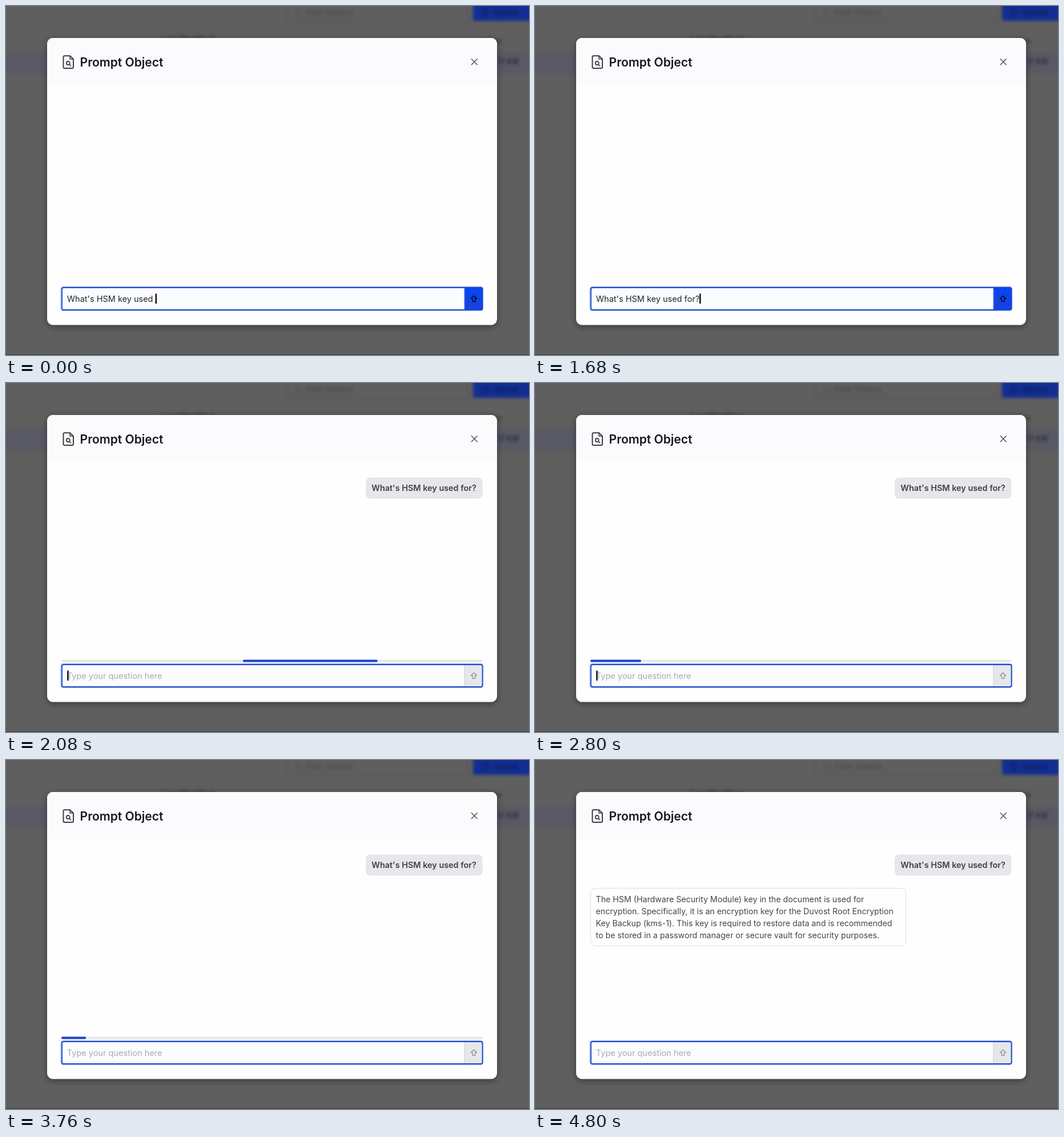
These frames come from a looping animation (916x611 px, 4.88 s). An HTML page with a canvas:

```html
<!DOCTYPE html>
<html lang="en">
<head>
<meta charset="utf-8">
<title>Prompt dialog</title>
<style>
  html, body { margin: 0; width: 100%; height: 100%; overflow: hidden; background: #5f5f5f; }
  canvas { display: block; width: 916px; height: 611px; }
</style>
</head>
<body>
<canvas id="stage" width="916" height="611"></canvas>
<script>
const W = 916, H = 611, LOOP = 4880, TICK = 80;
const SENT = 1760, ANSWERED = 3840;
const QUESTION = "What's HSM key used for?";
const ANSWER = [
  "The HSM (Hardware Security Module) key in the document is used for",
  "encryption. Specifically, it is an encryption key for the Duvost Root Encryption",
  "Key Backup (kms-1). This key is required to restore data and is recommended",
  "to be stored in a password manager or secure vault for security purposes."
];
const BLUE = "#2146cf", GREY = "#e6e7ea";
const TRACK = { x: 97, y: 484.5, w: 738, h: 4 };
const canvas = document.getElementById("stage");
const ctx = canvas.getContext("2d");

const clamp = v => Math.min(1, Math.max(0, v));
const font = (size, weight = 400) => `${weight} ${size}px Inter, "Open Sans", sans-serif`;

function text(str, x, y, size, color, weight, align = "left") {
  ctx.font = font(size, weight);
  ctx.textAlign = align;
  ctx.fillStyle = color;
  ctx.fillText(str, x, y);
}

function box(x, y, w, h, r, fill, stroke, line = 1) {
  ctx.beginPath();
  ctx.roundRect(x, y, w, h, r);
  if (fill) { ctx.fillStyle = fill; ctx.fill(); }
  if (stroke) { ctx.strokeStyle = stroke; ctx.lineWidth = line; ctx.stroke(); }
}

function path(d, color, width) {
  ctx.strokeStyle = color;
  ctx.lineWidth = width;
  ctx.lineCap = ctx.lineJoin = "round";
  ctx.stroke(new Path2D(d));
}

// Cubic ease with control points (.42, 0) and (.58, 1)
function easeInOut(x) {
  let lo = 0, hi = 1;
  for (let i = 0; i < 24; i++) {
    const s = (lo + hi) / 2, r = 1 - s;
    if (3 * r * r * s * 0.42 + 3 * r * s * s * 0.58 + s ** 3 < x) lo = s; else hi = s;
  }
  return lo * lo * (3 - 2 * lo);
}

function backdrop() {
  ctx.fillStyle = "#5f5f5f";
  ctx.fillRect(0, 0, W, H);
  ctx.save();
  ctx.filter = "blur(2.5px)";
  ctx.fillStyle = "#585964";
  ctx.fillRect(-10, 81, W + 20, 37);
  box(491, -12, 319, 38, 3, null, "#575757", 1.5);
  box(507, 7, 9, 9, 5, null, "#505050", 1.5);
  text("Filter Objects", 526, 16, 13, "#454545");
  box(818, -10, 110, 36, 3, "#142f94");
  box(834, 7, 10, 9, 2, null, "#0b1b58", 2);
  text("Upload", 853, 16, 13, "#0b1b58", 600);
  text("Last Modified", 272, 63, 14, "#383838", 600);
  text("Size", 842, 66, 13, "#383838", 600);
  text("17 KiB", 861, 102, 13, "#25262c", 500);
  ctx.restore();
  ctx.fillStyle = "#3a3a3a";
  ctx.fillRect(0, 610, W, 1);
}

function dialog() {
  ctx.save();
  ctx.shadowColor = "rgba(0,0,0,.4)";
  ctx.shadowBlur = 12;
  ctx.shadowOffsetY = 3;
  box(72, 56, 788, 502.5, 10, "#fefefe");
  ctx.restore();
  box(72, 56, 788, 83, [10, 10, 0, 0], "#fbfbfe");

  path("M102.5 87.2H112L118 93.2V106.8Q118 109 115.8 109H102.7Q100.5 109 100.5 106.8V89.4Q100.5 87.2 102.7 87.2", "#3e3e42", 2);
  path("M112 87.5V93H117.6", "#3e3e42", 1.5);
  path("M105.8 100a3 3 0 1 0 6 0a3 3 0 1 0 -6 0M111 102.3L113.3 104.6", "#3e3e42", 1.8);
  text("Prompt Object", 129.6, 105.5, 21, "#17181c", 600);
  path("M815.3 92.8L825.2 102.7M825.2 92.8L815.3 102.7", "#56565a", 1.6);
}

function progress(t) {
  const phase = ((t - 1665) % 1000) / 500;
  const first = phase < 1;
  const p = easeInOut(phase % 1);
  const left = first ? -0.3 + 0.776 * p : 0.476 + 0.75 * p;
  const right = first ? 0.797 * p : 0.797 + 0.75 * p;
  const { x, y, w, h } = TRACK;
  box(x, y, w, h, 2, GREY);
  const a = Math.max(0, left), b = Math.min(1, right);
  if (b > a) box(x + a * w, y, (b - a) * w, h, 2, "#1d42cf");
}

function chat(t) {
  if (t < SENT) return;
  box(630, 165.5, 204.5, 37, 8, GREY);
  text(QUESTION, 732, 189.2, 14.4, "#404044", 600, "center");
  if (t < ANSWERED) return progress(t);
  box(97.5, 224.5, 552, 101, 8, "#fefefe", "#dcdde0");
  ANSWER.forEach((line, i) => text(line, 106.5, 248.5 + 21 * i, 14.2, "#45454a"));
}

function typed(t) {
  if (t >= SENT) return "";
  const strokes = [880, 960, 1120, 1360];
  return QUESTION.slice(0, 20 + strokes.filter(s => t >= s).length);
}

// Each dip of the caret: start of fade out, start of fade in
function caretAlpha(t) {
  const dips = [[160, 400], [2400, 2640], [3520, 3760], [4400, 9000]];
  return dips.reduce((a, [off, on]) =>
    Math.min(a, Math.max(1 - clamp((t - off) / 160), clamp((t - on) / 160))), 1);
}

function field(t) {
  const str = typed(t), active = str !== "";
  box(96.5, 491.8, 738.5, 41.2, 4, null, "#a9bff5", 2.4);
  box(98, 493, 736.5, 39, 3, "#fbfcfe");
  const grad = ctx.createLinearGradient(0, 493, 0, 532);
  grad.addColorStop(0, "#0846f2");
  grad.addColorStop(1, "#1741de");
  box(803.5, 493, 31, 39, [0, 3, 3, 0], active ? grad : GREY);
  ctx.fillStyle = active ? BLUE : "#c3c6cd";
  ctx.fillRect(802.5, 493, 1, 39);
  box(98, 493, 736.5, 39, 3, null, BLUE, 1.8);
  path("M819.5 507.2L824.6 512.3H821.8V517.3H817.2V512.3H814.4Z", active ? "#05080f" : "#95979c", 1.4);

  text(active ? str : "Type your question here", 106.8, 518, 14.5, active ? "#232428" : "#aaabaf");
  const x = active ? 106.8 + ctx.measureText(str).width : 107.2;
  ctx.globalAlpha = caretAlpha(t);
  ctx.fillStyle = "#08080a";
  ctx.fillRect(x, 503.5, 2.4, 17.5);
  ctx.globalAlpha = 1;
}

function frame(now) {
  const t = Math.floor((now % LOOP) / TICK) * TICK;
  backdrop();
  dialog();
  chat(t);
  field(t);
  requestAnimationFrame(frame);
}
requestAnimationFrame(frame);
</script>
</body>
</html>
```
